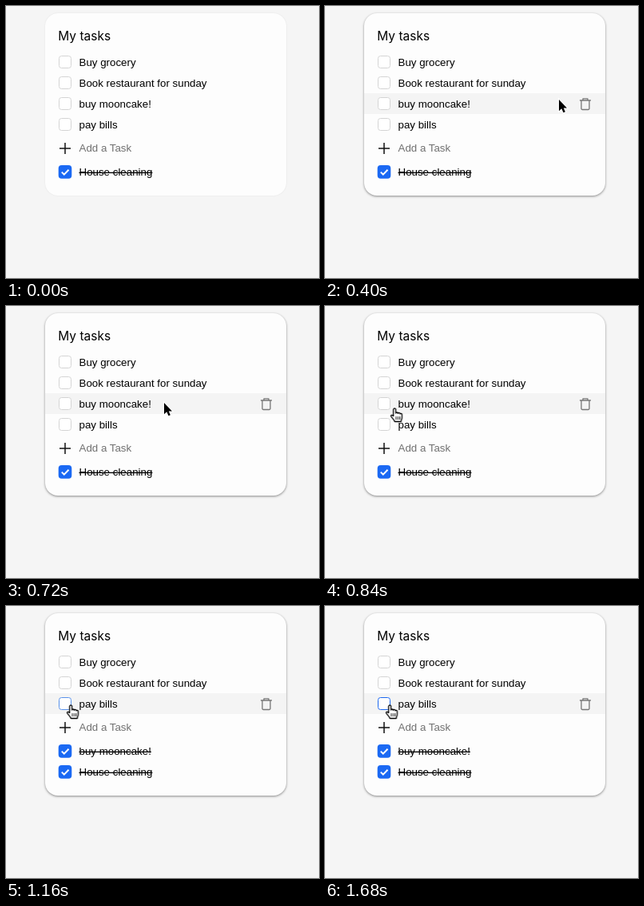
Recreate the animation shown at these times as an HTML page. Size 392 px wide and 340 px high, loop 1760 ms.

```html
<!DOCTYPE html>
<html lang="en">
<head>
<meta charset="utf-8">
<title>My tasks</title>
<style>
  html, body { margin: 0; width: 100%; height: 100%; overflow: hidden; background: #f5f5f5; }
  .card {
    position: absolute; left: 49px; top: 8.5px; width: 302px; height: 228px;
    border-radius: 16px; background: #fdfdfd;
    animation: lift 1760ms step-end infinite;
  }
  svg { position: absolute; left: 0; top: 0; }
  text { font: 13.333px "Liberation Sans", Arial, sans-serif; fill: #000; }
  .title { font: 15.5px Inter, sans-serif; }
  .hint { fill: #707070; }
  .done text { text-decoration: line-through; }
  .box { fill: #fff; stroke: #d4d4d4; }
  .line { fill: none; stroke: #777; stroke-width: 1.3; stroke-linejoin: round; stroke-linecap: round; }

  /* One step of the clock is 40 ms, 2.2727 % of the loop. */
  .hover, .cursor, .shift, .open, .checked, .arrow, .hand { animation: 1760ms step-end infinite; }
  .hover { animation-name: hover; }
  .cursor { animation-name: travel; }
  .shift { animation-name: shift; }
  .open { animation-name: leave; }
  .checked { animation-name: enter; }
  .arrow { animation-name: arrow; }
  .hand { animation-name: hand; }
  .open .box { animation: focus-first 1760ms linear infinite; }
  .shift .box { animation: focus-next 1760ms linear infinite; }

  @keyframes lift {
    0% { box-shadow: 0 0 2px rgba(0, 0, 0, .09); }
    2.27%, 100% { box-shadow: 0 1px 3px rgba(0, 0, 0, .45); }
  }
  @keyframes hover {
    0% { opacity: 0; transform: translateY(148px); }
    4.54% { opacity: 1; transform: translateY(148px); }
    6.81%, 100% { opacity: 1; transform: translateY(122px); }
  }
  @keyframes shift { 0% { transform: none; } 59.09%, 100% { transform: translateY(-26px); } }
  @keyframes leave { 0% { opacity: 1; } 59.09%, 100% { opacity: 0; } }
  @keyframes enter { 0% { opacity: 0; } 59.09%, 100% { opacity: 1; } }
  @keyframes arrow { 0% { opacity: 0; } 2.27% { opacity: 1; } 43.18%, 100% { opacity: 0; } }
  @keyframes hand { 0% { opacity: 0; } 43.18%, 100% { opacity: 1; } }
  @keyframes focus-first { 0%, 48% { stroke: #d4d4d4; } 59%, 100% { stroke: #6f9df5; } }
  @keyframes focus-next { 0%, 59.09% { stroke: #d4d4d4; } 65.9% { stroke: #5b92ea; } 73%, 100% { stroke: #1d68f0; } }
  @keyframes travel {
    0% { transform: translate(374px, 157px); }
    4.54% { transform: translate(340px, 146px); }
    6.81% { transform: translate(316px, 133px); }
    9.09% { transform: translate(303px, 124px); }
    11.36% { transform: translate(296px, 119px); }
    13.63% { transform: translate(293px, 117px); }
    25% { transform: translate(292px, 117px); }
    29.54% { transform: translate(289px, 117px); }
    31.81% { transform: translate(286px, 117px); }
    34.09% { transform: translate(282px, 117px); }
    36.36% { transform: translate(278px, 117px); }
    38.63% { transform: translate(245px, 118px); }
    40.9% { transform: translate(198px, 121px); }
    43.18% { transform: translate(146px, 125px); }
    45.45% { transform: translate(106px, 128px); }
    47.72% { transform: translate(87.3px, 128px); }
    50% { transform: translate(83.5px, 126px); }
    52.27% { transform: translate(82px, 125px); }
    54.54%, 100% { transform: translate(81.3px, 124px); }
  }
</style>
</head>
<body>
<div class="card"></div>
<svg width="392" height="340" viewBox="0 0 392 340">
  <defs>
    <g id="tick">
      <rect x="65.7" y="-8.3" width="16.6" height="16.6" rx="4" fill="#1b69f3"/>
      <path d="M69.8 .2l3 3 5.7-5.9" fill="none" stroke="#fff" stroke-width="2"/>
    </g>
  </defs>

  <g class="hover">
    <rect x="49" y="-13" width="302" height="26" fill="#f4f4f4"/>
    <path class="line" transform="translate(326 .5)"
      d="M-6.5-4.5H6.5M-3-4.5V-6.7H3V-4.5M-5-4.5V5.5Q-5 7-3.5 7H3.5Q5 7 5 5.5V-4.5"/>
  </g>

  <text class="title" x="65.3" y="43">My tasks</text>

  <g transform="translate(0 70)">
    <rect class="box" x="66.5" y="-7.5" width="15" height="15" rx="3"/>
    <text x="91.5" y="5">Buy grocery</text>
  </g>
  <g transform="translate(0 96)">
    <rect class="box" x="66.5" y="-7.5" width="15" height="15" rx="3"/>
    <text x="91.5" y="5">Book restaurant for sunday</text>
  </g>
  <g class="open">
    <rect class="box" x="66.5" y="114.5" width="15" height="15" rx="3"/>
    <text x="91.5" y="127">buy mooncake!</text>
  </g>
  <g class="shift">
    <rect class="box" x="66.5" y="140.5" width="15" height="15" rx="3"/>
    <text x="91.5" y="153">pay bills</text>
    <path d="M67 178H81M74 171V185" stroke="#111" stroke-width="1.5"/>
    <text class="hint" x="91.5" y="182">Add a Task</text>
  </g>
  <g class="checked">
    <g class="done" transform="translate(0 181.4)">
      <use href="#tick"/>
      <text x="91.5" y="5">buy mooncake!</text>
    </g>
  </g>
  <g class="done" transform="translate(0 207.4)">
    <use href="#tick"/>
    <text x="91.5" y="5">House cleaning</text>
  </g>

  <g class="cursor">
    <path class="arrow" d="M0 0V14.3L3.3 11.3 5.5 16.2 7.9 15.2 5.8 10.4H10Z"
      fill="#000" stroke="#fff" stroke-width="2" paint-order="stroke"/>
    <g class="hand" stroke="#000" stroke-width="1.3" stroke-linejoin="round" stroke-linecap="round">
      <path fill="#fff" d="M-1.6 9.5V1.5C-1.6-.5 1.4-.5 1.4 1.5V6C1.6 4.6 4 4.6 4.2 6.3 4.4 5 6.6 5.2 6.8 6.9 7.2 6 9.2 6.2 9.2 8.2V11.5C9.2 13.5 8 14.5 8 16.5H0C-.5 14.5-2.5 13-4.4 10.2-5.4 8.4-3.4 7.6-1.6 9.5Z"/>
      <path fill="none" stroke-width=".9" d="M1.8 10.5v3.2M4.2 10.5v3.2M6.5 10.5v3.2"/>
    </g>
  </g>
</svg>
</body>
</html>
```
